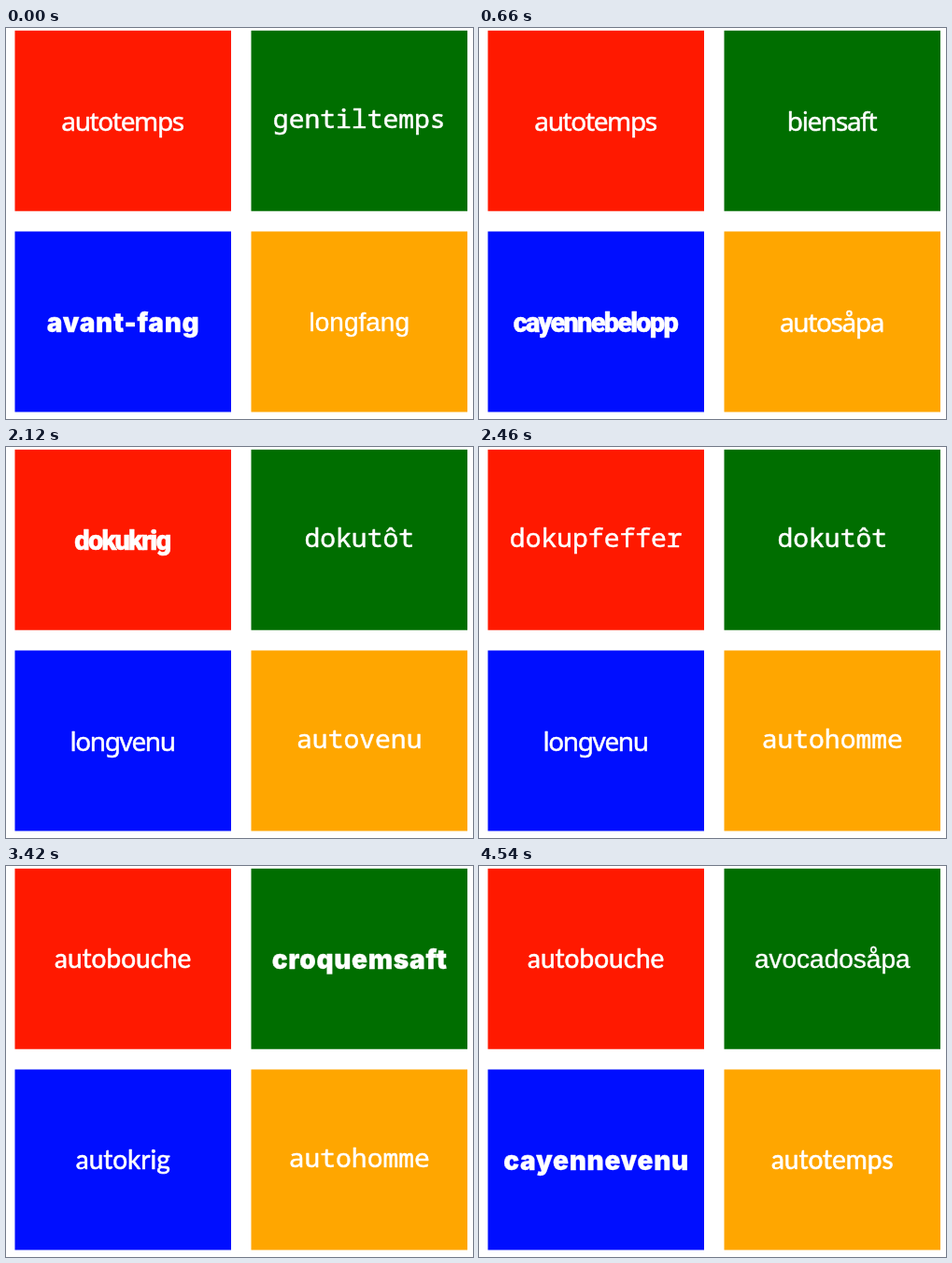
Animation of 500x418 px, one loop 4.56 s. Source, as an HTML page with a canvas:

```html
<!DOCTYPE html>
<html lang="en">
<head>
<meta charset="utf-8">
<title>Word cards</title>
<style>
  html, body { margin: 0; width: 100%; height: 100%; overflow: hidden; background: #fff; }
  canvas { display: block; }
</style>
</head>
<body>
<canvas id="stage" width="500" height="418"></canvas>
<script>
const ctx = document.getElementById('stage').getContext('2d');
const LOOP = 4560;
const CARD = { w: 231.5, h: 193 };

// drop: baseline offset from the middle of the card; stroke: extra line weight
const faces = {
  humanist: { font: '28px "Noto Sans", sans-serif', spacing: -1.37, drop: 10.5, stroke: 0.5 },
  mono: { font: '28px "Noto Sans Mono", monospace', spacing: 0, drop: 7.5, stroke: 0.5 },
  black: { font: '900 28px Inter, sans-serif', spacing: 0.7, drop: 11, stroke: 0.3 },
  tight: { font: '900 29px Roboto, sans-serif', spacing: -1.8, drop: 10.5, stroke: 0.5 },
  round: { font: '28px Lato, sans-serif', spacing: 0, drop: 9.7, stroke: 0.6 },
  plain: { font: '28px "Liberation Sans", sans-serif', spacing: 0, drop: 9.5, stroke: 0.4 }
};

// Each word entry: start time, text, face
const cards = [
  { x: 9.5, y: 2.75, color: '#ff1900', words: [
    [0, 'autotemps', 'humanist'],
    [960, 'dokukrig', 'tight'],
    [2160, 'dokupfeffer', 'mono'],
    [3360, 'autobouche', 'round']
  ] },
  { x: 262.5, y: 2.75, color: '#006e00', words: [
    [0, 'gentiltemps', 'mono'],
    [360, 'biensaft', 'humanist'],
    [1560, 'dokutôt', 'mono'],
    [2760, 'croquemsaft', 'black'],
    [3960, 'avocadosåpa', 'plain']
  ] },
  { x: 9.5, y: 217.5, color: '#000eff', words: [
    [0, 'avant-fang', 'black'],
    [660, 'cayennebelopp', 'tight'],
    [1860, 'longvenu', 'humanist'],
    [3060, 'autokrig', 'round'],
    [4280, 'cayennevenu', 'black']
  ] },
  { x: 262.5, y: 217.5, color: '#ffa600', words: [
    [0, 'longfang', 'plain'],
    [60, 'autosåpa', 'humanist'],
    [1260, 'autovenu', 'mono'],
    [2460, 'autohomme', 'mono'],
    [3660, 'autotemps', 'round']
  ] }
];

function drawCard(card, time) {
  ctx.fillStyle = card.color;
  ctx.fillRect(card.x, card.y, CARD.w, CARD.h);

  const [, text, name] = card.words.findLast(([start]) => start <= time);
  const { font, spacing, drop, stroke } = faces[name];
  // Half a space makes up for the one after the last letter
  const x = card.x + (CARD.w + spacing) / 2;
  const y = card.y + CARD.h / 2 + drop;
  ctx.font = font;
  ctx.letterSpacing = spacing + 'px';
  ctx.lineWidth = stroke;
  ctx.fillStyle = ctx.strokeStyle = '#fff';
  ctx.fillText(text, x, y);
  ctx.strokeText(text, x, y);
}

function render(now) {
  const time = Math.max(0, now - startTime) % LOOP;
  ctx.fillStyle = '#fff';
  ctx.fillRect(0, 0, 500, 418);
  ctx.textAlign = 'center';
  ctx.lineJoin = 'round';
  cards.forEach(card => drawCard(card, time));
  requestAnimationFrame(render);
}

const startTime = performance.now();
render(startTime);
</script>
</body>
</html>
```
